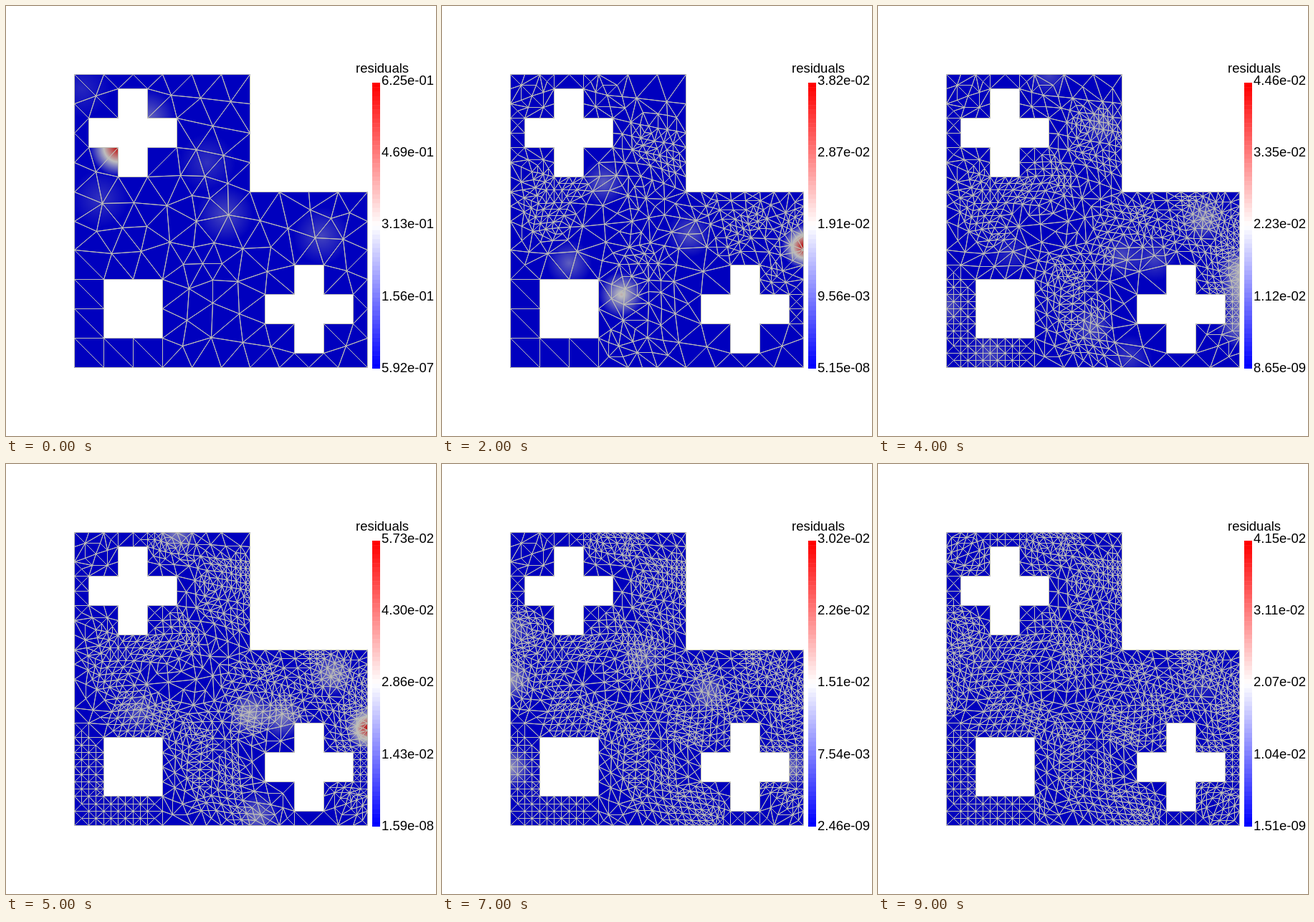
Animation, 600 px wide and 600 px high, one loop 10 s. Source, as an HTML page with a canvas:

```html
<!DOCTYPE html>
<html lang="en">
<head>
<meta charset="utf-8">
<title>Adaptive mesh residuals</title>
<style>
html, body { margin: 0; width: 100%; height: 100%; overflow: hidden; background: #fff; }
canvas, svg { position: absolute; left: 0; top: 0; width: 600px; height: 600px; }
text { font: 18.5px "Liberation Sans", Arial, sans-serif; fill: #000; }
</style>
</head>
<body>
<canvas id="view" width="600" height="600"></canvas>
<svg id="legend" viewBox="0 0 600 600"><text x="488" y="93">residuals</text></svg>
<script>
const STEP_MS = 1000, STEPS = 10, UNIT = 40.95, LEFT = 300 - 5 * UNIT;
const at = i => LEFT + UNIT * i;
const steps = [];

// Each hot spot is [x, y, strength].
function step(index, max, min, ...spots) {
  steps[index] = { max, min, spots };
}

step(0, 0.625, 5.92e-7, [156, 197, 1], [197, 156, .27], [280, 218, .13], [305, 290, .19],
  [440, 320, .18], [131, 268, .13], [105, 115, .1]);
step(1, 0.05896, 1.8e-7, [505, 306, .85], [487, 402, .9], [311, 190, .36], [155, 270, .35],
  [297, 384, .38], [272, 467, .28], [407, 300, .35]);
step(2, 0.03824, 5.15e-8, [505, 335, 1], [250, 402, .55], [177, 358, .25], [225, 246, .25],
  [345, 318, .22]);
step(3, 0.031935, 1.4e-9, [95, 420, .46], [505, 403, .9], [503, 445, .7], [298, 447, .46],
  [155, 485, .4], [311, 165, .42], [452, 302, .3]);
step(5, 0.05728, 1.59e-8, [505, 368, 1], [340, 348, .4], [385, 352, .35], [455, 292, .36],
  [238, 95, .35], [185, 345, .22], [350, 490, .3]);
step(7, 0.03016, 2.46e-9, [370, 318, .28], [95, 300, .42], [95, 423, .42], [98, 230, .25],
  [485, 423, .32], [280, 270, .2]);
step(9, 0.04148, 1.51e-9, [450, 310, .12], [145, 270, .08]);

// The steps left out lie halfway between their neighbours.
for (let i = 0; i < STEPS; i++) {
  if (steps[i]) continue;
  const a = steps[i - 1], b = steps[i + 1];
  const faded = [...a.spots, ...b.spots].map(([x, y, v]) => [x, y, v / 2]);
  step(i, (a.max + b.max) / 2, (a.min + b.min) / 2, ...faded);
}
steps.forEach((s, i) => {
  s.longest = 70 - 4.6 * i;
  s.radius = i ? 32 : 40;
});

function inDomain(px, py) {
  const x = (px - LEFT) / UNIT, y = (py - LEFT) / UNIT;
  if (Math.min(x, y) < 0 || Math.max(x, y) > 10 || (x > 6 && y < 4)) return false;
  if (Math.abs(x - 2) < 1 && Math.abs(y - 8) < 1) return false;
  return ![2, 8].some(c => {
    const dx = Math.abs(x - c), dy = Math.abs(y - c);
    return Math.max(dx, dy) < 1.5 && Math.min(dx, dy) < .5;
  });
}

function boundaryPoints() {
  const pts = [];
  for (let i = 0; i <= 10; i++) for (let j = 0; j <= 10; j++) {
    const outer = i === 0 || j === 10 || (j === 0 && i <= 6) || (i === 6 && j <= 4) ||
      (j === 4 && i >= 6) || (i === 10 && j >= 4);
    const square = Math.max(Math.abs(i - 2), Math.abs(j - 8)) === 1;
    if (outer || square) pts.push([at(i), at(j)]);
  }
  for (const c of [2, 8])
    for (const [a, b] of [[.5, .5], [.5, 1.5], [1.5, .5]])
      for (const sx of [-1, 1]) for (const sy of [-1, 1])
        pts.push([at(c + sx * a), at(c + sy * b)]);
  return pts;
}

// Fills the largest gaps first, then evens out the spacing.
function seedMesh() {
  const pts = boundaryPoints(), fixed = pts.length, gaps = [];
  for (let x = at(.1); x < at(10); x += 5) for (let y = at(.1); y < at(10); y += 5)
    if (inDomain(x, y)) gaps.push({ x, y, d: Infinity });
  const near = ([px, py]) => {
    for (const g of gaps) g.d = Math.min(g.d, Math.hypot(g.x - px, g.y - py));
  };
  pts.forEach(near);
  for (;;) {
    const best = gaps.reduce((a, b) => b.d > a.d ? b : a);
    if (best.d < 29) break;
    pts.push([best.x, best.y]);
    near([best.x, best.y]);
  }
  for (let round = 0; round < 3; round++) {
    const links = pts.map(() => new Set());
    for (const t of triangulate(pts)) for (const a of t) for (const b of t)
      if (a !== b) links[a].add(b);
    for (let i = fixed; i < pts.length; i++) pts[i] = centre(pts, [...links[i]]);
  }
  return pts;
}

// Bowyer-Watson; a slight shear settles ties between equal diagonals.
function triangulate(pts) {
  const n = pts.length;
  const all = [...pts, [-1e5, -1e5], [2e5, -1e5], [300, 2e5]].map(([x, y]) => [x - y * .001, y]);
  const circle = t => {
    const [[ax, ay], [bx, by], [cx, cy]] = t.map(i => all[i]);
    const ux = bx - ax, uy = by - ay, vx = cx - ax, vy = cy - ay;
    const d = 2 * (ux * vy - uy * vx), u = ux * ux + uy * uy, v = vx * vx + vy * vy;
    const x = (vy * u - uy * v) / d, y = (ux * v - vx * u) / d;
    return { t, x: ax + x, y: ay + y, r: x * x + y * y };
  };
  let cells = [circle([n, n + 1, n + 2])];
  for (let p = 0; p < n; p++) {
    const [px, py] = all[p], rim = new Map(), kept = [];
    for (const cell of cells) {
      if ((px - cell.x) ** 2 + (py - cell.y) ** 2 >= cell.r) { kept.push(cell); continue; }
      for (const [a, b] of sides(cell.t)) {
        const k = edgeKey(a, b);
        if (rim.has(k)) rim.delete(k); else rim.set(k, [a, b]);
      }
    }
    cells = kept;
    for (const [a, b] of rim.values()) cells.push(circle([a, b, p]));
  }
  return cells.map(c => c.t).filter(t => t.every(i => i < n) && inDomain(...centre(pts, t)));
}

function sides([a, b, c]) { return [[a, b, c], [b, c, a], [c, a, b]]; }
function edgeKey(a, b) { return a < b ? a + "," + b : b + "," + a; }
function centre(pts, ids) { return [0, 1].map(k => ids.reduce((s, i) => s + pts[i][k], 0) / ids.length); }

// Quarters cells that are too long or were hot one step before, then closes the neighbours.
function refine(pts, tris, longest, { spots, radius }) {
  const length = ([a, b]) => Math.hypot(pts[a][0] - pts[b][0], pts[a][1] - pts[b][1]);
  const byLength = t => sides(t).sort((p, q) => length(q) - length(p));
  const cut = new Set(), middles = new Map(), out = [];
  const isCut = ([a, b]) => cut.has(edgeKey(a, b));
  const ranked = tris.map(byLength);

  tris.forEach((t, i) => {
    const size = length(ranked[i][0]), [x, y] = centre(pts, t);
    const hot = size > 20 && spots.some(s => Math.hypot(x - s[0], y - s[1]) < radius * 1.25);
    if (hot || size > longest) ranked[i].forEach(([a, b]) => cut.add(edgeKey(a, b)));
  });
  for (let before = -1; before !== cut.size;) {
    before = cut.size;
    for (const edges of ranked)
      if (edges.some(isCut)) cut.add(edgeKey(edges[0][0], edges[0][1]));
  }

  const middle = (a, b) => {
    const k = edgeKey(a, b);
    if (!middles.has(k)) middles.set(k, pts.push(centre(pts, [a, b])) - 1);
    return middles.get(k);
  };
  const split = t => {
    const edge = byLength(t).find(isCut);
    if (!edge) { out.push(t); return; }
    const [a, b, c] = edge, m = middle(a, b);
    split([a, m, c]);
    split([m, b, c]);
  };
  tris.forEach(split);
  return out;
}

// Blue to white to red, at the given brightness.
function blend(v, full) {
  const s = Math.min(1, Math.max(0, v)) * 2;
  return s < 1 ? [full * s, full * s, full] : [full, full * (2 - s), full * (2 - s)];
}

function paint(pts, tris, { spots, radius }) {
  const canvas = document.createElement("canvas");
  canvas.width = canvas.height = 600;
  const g = canvas.getContext("2d"), img = g.createImageData(600, 600);
  for (let y = 95; y < 505; y++) for (let x = 95; x < 505; x++) {
    if (!inDomain(x + .5, y + .5)) continue;
    let v = 0;
    for (const [sx, sy, peak] of spots)
      v += peak * Math.max(0, 1 - Math.hypot(x - sx, y - sy) / radius);
    img.data.set([...blend(v, 190), 255], (y * 600 + x) * 4);
  }
  g.putImageData(img, 0, 0);

  g.beginPath();
  for (const t of tris) {
    t.forEach((i, k) => {
      const [x, y] = pts[i].map(c => Math.floor(c) + .5);
      if (k) g.lineTo(x, y); else g.moveTo(x, y);
    });
    g.closePath();
  }
  g.strokeStyle = "#bfbfb6";
  g.lineWidth = 1;
  g.lineJoin = "bevel";
  g.stroke();

  const bands = 64, height = 399 / bands;
  for (let i = 0; i < bands; i++) {
    g.fillStyle = `rgb(${blend(1 - i / (bands - 1), 255).map(Math.round)})`;
    g.fillRect(511, 107 + i * height, 11, height + (i < bands - 1 ? .5 : 0));
  }
  return canvas;
}

const points = seedMesh();
let cells = triangulate(points);
const pictures = steps.map((s, i) => {
  if (i) cells = refine(points, cells, s.longest, steps[i - 1]);
  return paint(points, cells, s);
});

const legend = document.getElementById("legend");
const labels = Array.from({ length: 5 }, (_, i) => {
  const label = document.createElementNS(legend.namespaceURI, "text");
  label.setAttribute("x", 524);
  label.setAttribute("y", 110 + 100.2 * i);
  return legend.appendChild(label);
});
const view = document.getElementById("view").getContext("2d");
const format = v => v.toExponential(2).replace(/-(\d)$/, "-0$1");
const start = performance.now();
let shown = -1;

function show() {
  const now = Math.floor((performance.now() - start) / STEP_MS) % STEPS;
  if (now !== shown) {
    shown = now;
    const { max, min } = steps[now];
    view.clearRect(0, 0, 600, 600);
    view.drawImage(pictures[now], 0, 0);
    labels.forEach((label, i) => { label.textContent = format(i < 4 ? max * (4 - i) / 4 : min); });
  }
  requestAnimationFrame(show);
}
show();
</script>
</body>
</html>
```
